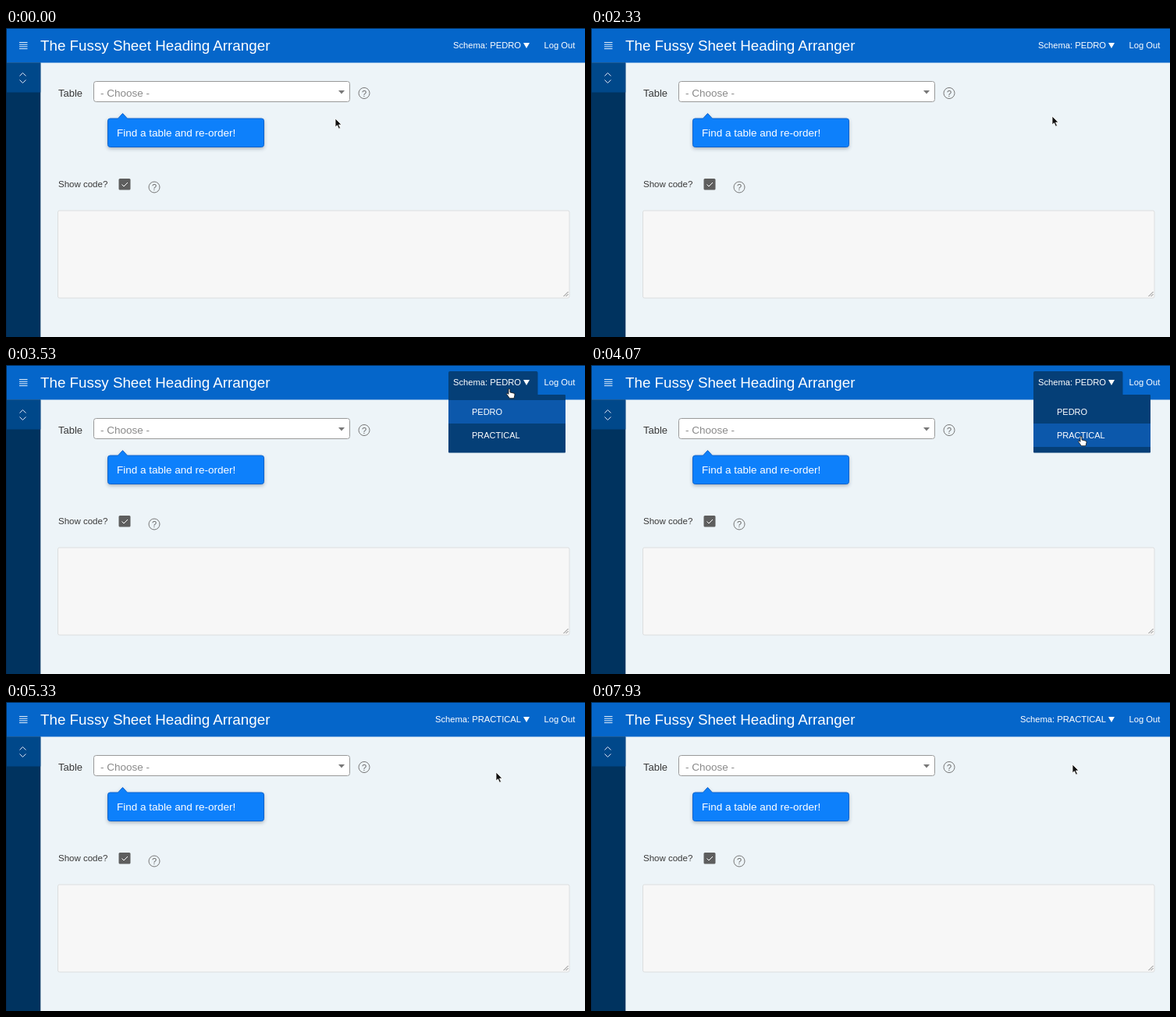
An HTML page for the animation above (8000 ms loop, 742x396 px).

```html
<!DOCTYPE html>
<html lang="en">
<head>
<meta charset="utf-8">
<style>
html, body { margin: 0; width: 100%; height: 100%; overflow: hidden; background: #edf4f8; }
svg { display: block; width: 742px; height: 396px; font-family: "Liberation Sans", Arial, sans-serif; }
.line { fill: none; stroke-width: 1; }
</style>
</head>
<body>
<svg viewBox="0 0 742 396">
  <defs>
    <filter id="shadow" x="-10%" y="-30%" width="120%" height="180%">
      <feDropShadow dx="0" dy="2" stdDeviation="2" flood-color="#345" flood-opacity=".35"/>
    </filter>
    <g id="help">
      <circle r="7" class="line" stroke="#777"/>
      <text y="4" text-anchor="middle" font-size="11" fill="#666">?</text>
    </g>
  </defs>

  <!-- header and side bar -->
  <rect width="742" height="396" fill="#edf4f8"/>
  <rect width="742" height="44.500" fill="#0566ca"/>
  <rect y="44.500" width="44.300" height="352" fill="#00335f"/>
  <rect y="44.500" width="44.300" height="38" fill="#00488a"/>
  <path d="M0 .5H742M.5 0V396" stroke="#022c55"/>
  <path d="M17 18.500h10.500m-10.500 2.700h10.500m-10.500 2.700h10.500m-10.500 2.700h10.500" stroke="#e4eefa"/>
  <path d="M17.500 61.500l4-4 4 4m-8 5l4 4 4-4" class="line" stroke="#dbe8f4"/>
  <text x="44" y="29" font-size="18.800" fill="#fff">The Fussy Sheet Heading Arranger</text>

  <!-- form -->
  <g fill="#383838">
    <text x="67" y="88" font-size="13">Table</text>
    <text x="67" y="203.500" font-size="11.500">Show code?</text>
  </g>
  <use href="#help" x="459" y="83.500"/>
  <use href="#help" x="190" y="204"/>
  <rect x="144.500" y="193" width="15" height="14.500" rx="1.500" fill="#5e5e5e"/>
  <path d="M148.500 200.500l2.500 2.500 5-5" class="line" stroke="#fff"/>
  <rect x="66.500" y="234" width="655.500" height="112" rx="2" fill="#f7f7f7" stroke="#dcdedf"/>
  <path d="M714.500 344l6-6m-3 6l3-3" stroke="#777" stroke-width=".9"/>
  <path d="M133.500 116h10l6-6.500 6 6.500h172q3 0 3 3v30.500q0 3-3 3h-194q-3 0-3-3v-30.500q0-3 3-3z"
        fill="#1080fb" stroke="#0a64cc" filter="url(#shadow)"/>
  <text x="142" y="139" font-size="13.500" fill="#fff">Find a table and re-order!</text>

  <!-- select -->
  <rect id="box" x="112.500" y="68.500" width="328" rx="3" fill="#fff" stroke="#999"/>
  <text x="121" y="88" font-size="13.500" fill="#8a8a8a">- Choose -</text>
  <path id="arrow" d="M426 80h8l-4 4.500z" fill="#777"/>
  <g id="drop">
    <path d="M113 94.500h327" stroke="#999"/>
    <rect x="118" y="98.800" width="316.500" height="27.200" rx="2" fill="#fff" stroke="#1c5fb5" stroke-width="1.800"/>
    <path id="caret" d="M122.500 105v16" stroke="#111"/>
    <rect id="active" x="113" y="130.500" width="326.500" height="30" fill="#4f8ff8"/>
    <g id="rows" font-size="12.700"></g>
  </g>

  <!-- schema menu -->
  <g id="menu" fill="#053f77">
    <rect x="567" y="8" width="114.500" height="32" rx="2"/>
    <rect x="567" y="38" width="150" height="74.500" rx="1"/>
    <rect id="hover" x="567" width="150" height="30" fill="#0c58ab"/>
    <g font-size="11" fill="#fff">
      <text x="597" y="64">PEDRO</text>
      <text x="597" y="94">PRACTICAL</text>
    </g>
  </g>
  <g font-size="11.200" fill="#fff">
    <text id="schema" x="660" y="26" text-anchor="end"></text>
    <path d="M663 19h8l-4 7z"/>
    <text x="689.500" y="26">Log Out</text>
  </g>

  <g stroke="#fff" stroke-width=".8" stroke-linejoin="round">
    <path id="pointer" d="M0 0v11l2.500-2.300 2 4.500 2-.9-2-4.300h3.500z" fill="#111"/>
    <path id="hand" d="M-1 2q1-1.500 2 0v4l5 1.200q1.300.5 1 2l-1 4.500h-5.500l-4-5.500q0-1.500 1.500-.8l1 1z"
          fill="#fff" stroke="#111"/>
  </g>
</svg>
<script>
const $ = id => document.getElementById(id);
const show = (id, on) => $(id).style.display = on ? "" : "none";

// time, x, y of the mouse
const path = [
  [0, 422, 116], [400, 422, 116], [670, 425, 90], [1870, 425, 90],
  [2000, 591, 113], [2670, 591, 113], [3250, 645, 29], [3530, 645, 29],
  [4070, 628, 90], [5530, 628, 90], [6000, 396, 86], [7200, 396, 86],
  [7400, 605, 89], [7880, 605, 89], [7930, 617, 80], [8000, 617, 80]
];
const drops = [
  { open: 930, filled: 1070, blink: 1470, close: 2330,
    names: ["BEERS", "COUNTRIES", "DEPARTMENTS", "EMPLOYEES", "JOB_HISTORY", "LOCATIONS"] },
  { open: 6270, filled: 6530, blink: 6730, close: 7670,
    names: ["BREWERIES", "CHANNELS_DIM", "MEADOW_GEN_ZERO", "CUSTOMERS", "CUSTOMER_FAVORITES", "CUSTOMER_REVIEWS"] }
];

function mouseAt(t) {
  const i = path.findIndex(p => p[0] > t);
  const [t0, x0, y0] = path[i - 1], [t1, x1, y1] = path[i];
  const u = (t - t0) / (t1 - t0), e = u * u * (3 - 2 * u);
  return [x0 + (x1 - x0) * e, y0 + (y1 - y0) * e];
}

function drawSelect(t) {
  const d = drops.find(d => t >= d.open && t < d.close);
  const filled = d && t >= d.filled;
  $("box").setAttribute("height", !d ? 26 : filled ? 250.5 : 93);
  $("arrow").setAttribute("transform", d ? "matrix(1 0 0 -1 0 165.5)" : "");
  show("drop", d);
  if (!d) return;
  show("caret", Math.floor((t - d.blink) / 500) % 2);
  show("active", filled);
  const names = filled ? d.names : ["Searching…"];
  $("rows").innerHTML = names.map((name, i) =>
    `<text x="119" y="${150 + 30 * i}" fill="${filled && !i ? "#fff" : "#282828"}">${name}</text>`).join("");
}

function draw(now) {
  const t = now % 8000, [x, y] = mouseAt(t);
  drawSelect(t);
  show("menu", t >= 3400 && t < 4530);
  $("hover").setAttribute("y", y < 75 ? 45 : 75);
  $("schema").textContent = "Schema: " + (t < 5000 ? "PEDRO" : "PRACTICAL");

  const onSelect = x > 112 && x < 441 && y > 68 && y < 95;
  const onMenu = x > 567 && x < 682 && y < 38 || t >= 3400 && t < 4730;
  const hand = onSelect || onMenu;
  show("hand", hand);
  show("pointer", !hand);
  $(hand ? "hand" : "pointer").setAttribute("transform", `translate(${x} ${y})`);
  requestAnimationFrame(draw);
}
requestAnimationFrame(draw);
</script>
</body>
</html>
```
